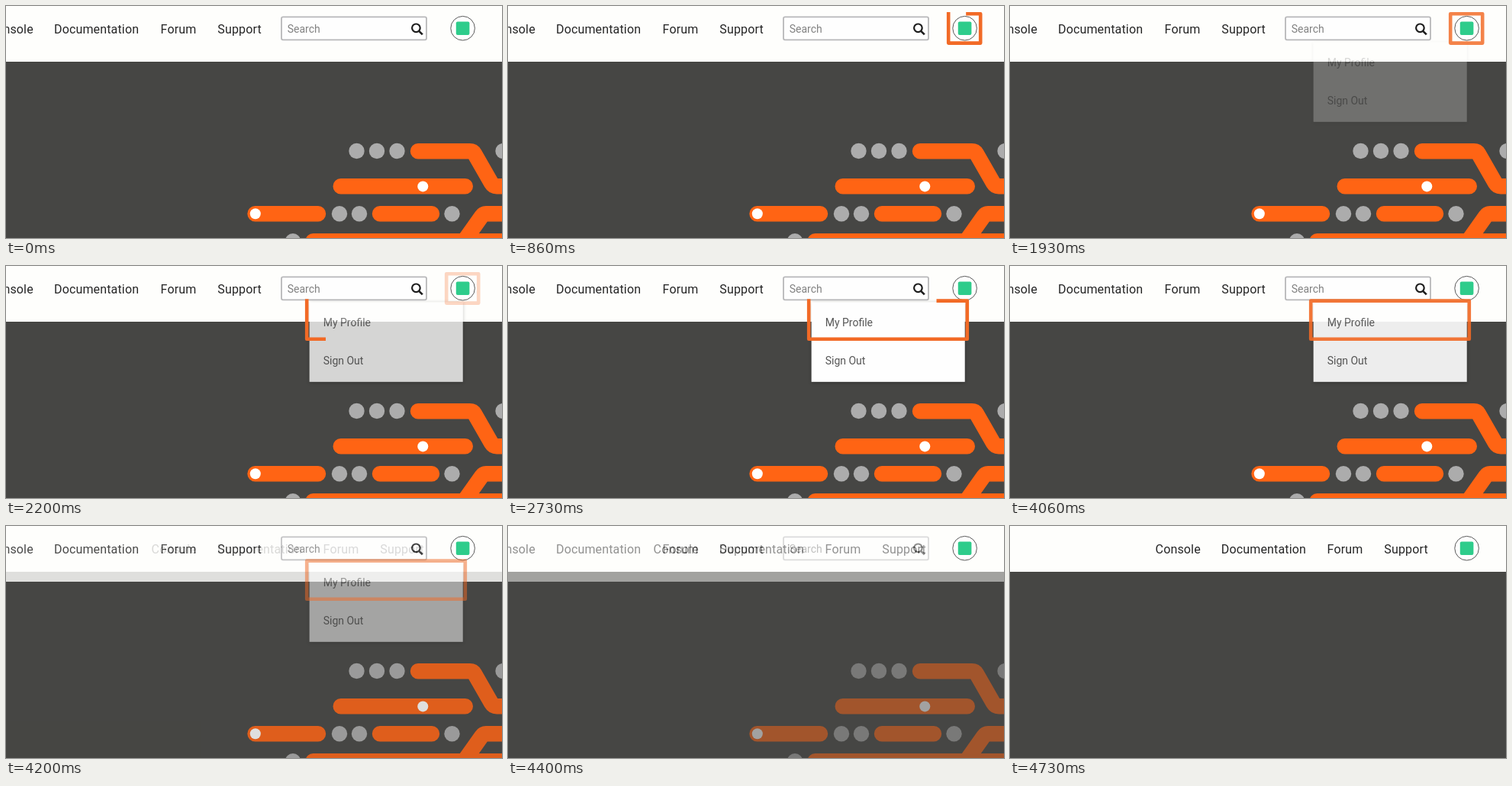
An HTML page for the animation above (4.93 s loop, 650x304 px).

```html
<!DOCTYPE html>
<html lang="en">
<head>
<meta charset="utf-8">
<title>Profile menu walkthrough</title>
<style>
  html, body { margin: 0; width: 100%; height: 100%; overflow: hidden; background: #fefefc; }
  svg { display: block; width: 650px; height: 304px; font: 14px Roboto, sans-serif; }
  .nav { font-size: 16px; letter-spacing: .15px; fill: #262626; }
  .bar { fill: #fefefc; }
  .track { fill: none; stroke: #ff6414; stroke-width: 20.4; stroke-linecap: round; stroke-linejoin: round; }
  .dots { fill: #acacac; }
  .mark { fill: none; stroke: #f26a26; stroke-width: 4.6; stroke-linecap: square; stroke-linejoin: round; }
  #menu { fill: #565656; }
</style>
</head>
<body>
<svg viewBox="0 0 650 304">
  <defs>
    <filter id="shadow" x="-10%" y="-10%" width="120%" height="125%">
      <feDropShadow dx="0" dy="1" stdDeviation="2.5" flood-opacity=".3"/>
    </filter>
  </defs>

  <!-- next page -->
  <rect width="650" height="304" fill="#464644"/>
  <rect class="bar" width="650" height="60"/>
  <g class="nav">
    <text x="190.6" y="35.5">Console</text>
    <text x="276.8" y="35.5">Documentation</text>
    <text x="415.6" y="35.5">Forum</text>
    <text x="490.3" y="35.5">Support</text>
  </g>

  <!-- first page -->
  <g id="home">
    <rect width="650" height="304" fill="#464644"/>
    <rect class="bar" width="650" height="73"/>
    <g class="nav">
      <text x="-23.4" y="35.5">Console</text>
      <text x="63" y="35.5">Documentation</text>
      <text x="202.6" y="35.5">Forum</text>
      <text x="277.3" y="35.5">Support</text>
    </g>
    <rect x="361" y="14.3" width="190" height="30" rx="2" fill="#fefefe" stroke="#b8b8ba" stroke-width="1.8"/>
    <text x="368.7" y="34.5" fill="#828282">Search</text>
    <g fill="none" stroke="#1c1c1c" stroke-width="2.2">
      <circle cx="537.4" cy="28.8" r="5.3"/>
      <path d="M541.2 32.8L545.8 37.4" stroke-width="2.6"/>
    </g>
    <g class="dots">
      <circle cx="459.5" cy="190" r="10.2"/>
      <circle cx="486" cy="190" r="10.2"/>
      <circle cx="512.5" cy="190" r="10.2"/>
      <circle cx="651.5" cy="190" r="10.2"/>
      <circle cx="437" cy="272.2" r="10.2"/>
      <circle cx="463" cy="272.2" r="10.2"/>
      <circle cx="584.5" cy="272.2" r="10.2"/>
      <circle cx="376" cy="308.2" r="10.2"/>
    </g>
    <path class="track" d="M540 190.2H608Q612 190.2 614 193.6L636 232Q638.5 236.3 643 236.3H670
      M438.7 236.3H601.8M326.5 272.3H409M490 272.3H558
      M670 272.3H629Q625.5 272.3 623.3 275.5L600 308.3M402.5 308.3H670"/>
    <g fill="#fff">
      <circle cx="546.3" cy="236.4" r="7"/>
      <circle cx="326.8" cy="272.3" r="7"/>
    </g>
  </g>

  <circle cx="598.6" cy="29.2" r="15.8" fill="#fefefe" stroke="#5a5a5a"/>
  <rect x="589.8" y="20.4" width="17.6" height="17.6" rx="2" fill="#2ecc8b"/>

  <g id="menu">
    <rect x="397.7" y="47.5" width="201" height="104.3" fill="#fefefe" filter="url(#shadow)"/>
    <text x="415.7" y="79">My Profile</text>
    <text x="415.7" y="129">Sign Out</text>
  </g>

  <path id="avatarMark" class="mark" pathLength="1" d="M577.2 10.3V48.6H619.2V10.3Z"/>
  <path id="itemMark" class="mark" pathLength="1" d="M394.2 45.6V95.8H601.8V45.6Z"/>
</svg>
<script>
  const LOOP = 4930;
  const el = id => document.getElementById(id);
  const ramp = (t, from, to) => Math.min(1, Math.max(0, (t - from) / (to - from)));

  function drawMark(id, progress, opacity) {
    const style = el(id).style;
    style.strokeDasharray = progress < 1 ? `${progress} 2` : 'none';
    style.opacity = progress > 0 ? opacity : 0;
  }

  function render(t) {
    const leave = 1 - ramp(t, 4030, 4380);
    el('menu').style.opacity = ramp(t, 1820, 2310) * leave;
    el('home').style.opacity = 1 - ramp(t, 4100, 4700);
    drawMark('avatarMark', ramp(t, 10, 1020), 1 - ramp(t, 1850, 2330));
    drawMark('itemMark', ramp(t, 2060, 3060), leave);
  }

  const start = performance.now();
  function tick() {
    render((performance.now() - start) % LOOP);
    requestAnimationFrame(tick);
  }
  tick();
</script>
</body>
</html>
```
